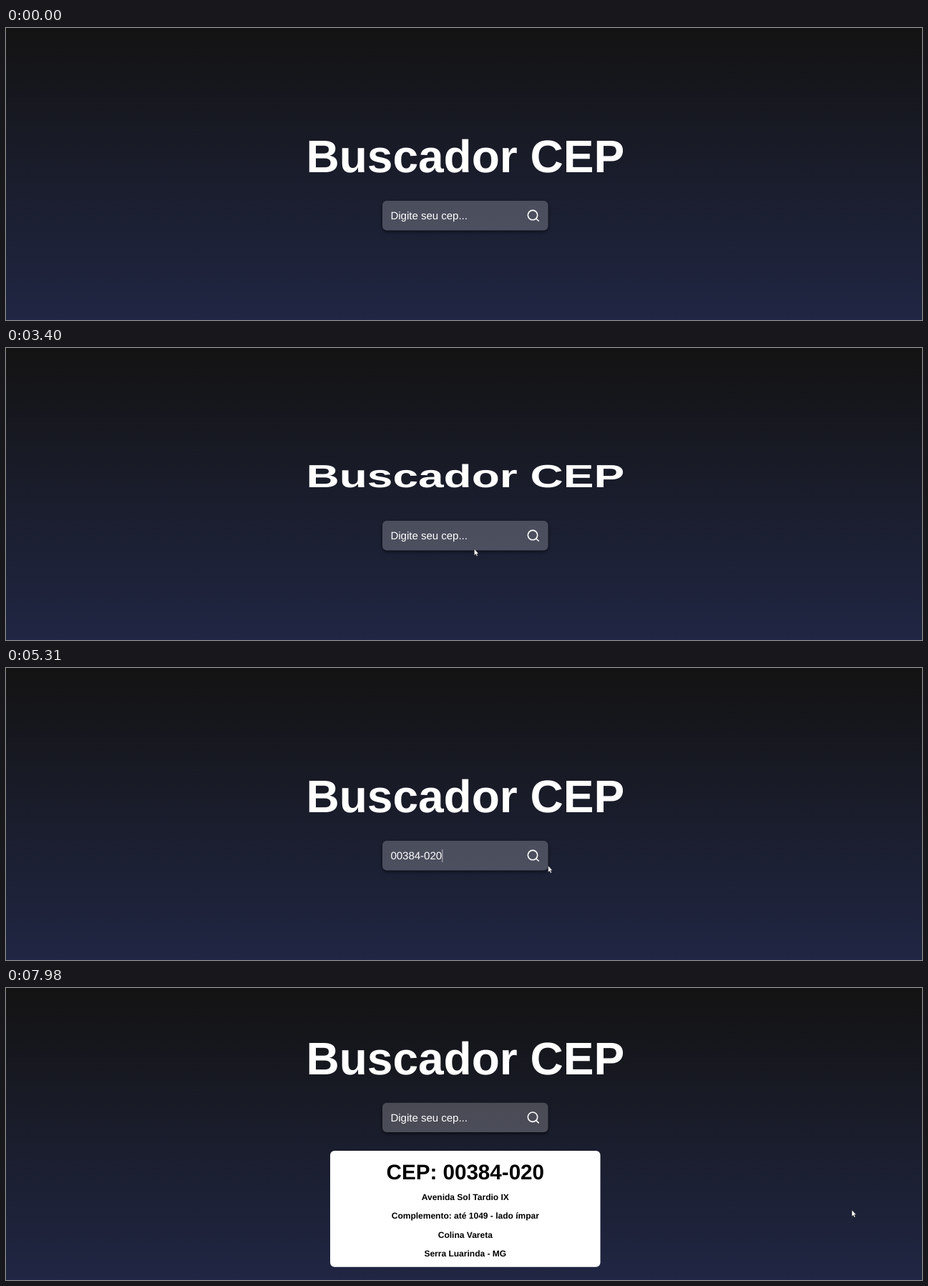
Write an HTML page that moves like this. It is 1280 by 409 pixels and loops after 8000 ms.

```html
<!DOCTYPE html>
<html lang="pt-BR">
<head>
<meta charset="utf-8">
<title>Buscador CEP</title>
<style>
  html, body { margin: 0; width: 100%; height: 100%; overflow: hidden; background: #121212; }
  svg { display: block; width: 100vw; height: 100vh; }
  text { font-family: "Liberation Sans", Arial, sans-serif; text-rendering: geometricPrecision; }
  .bold { font-weight: 700; text-anchor: middle; }
  .line { font-size: 12px; }
</style>
</head>
<body>
<svg viewBox="0 0 1280 409" preserveAspectRatio="none">
  <defs>
    <linearGradient id="sky" x1="0" y1="0" x2="0" y2="1">
      <stop offset="0" stop-color="#131313"/>
      <stop offset="1" stop-color="#202643"/>
    </linearGradient>
    <filter id="blur" x="-10%" y="-40%" width="120%" height="180%">
      <feGaussianBlur stdDeviation="2.2"/>
    </filter>
    <clipPath id="outside">
      <path clip-rule="evenodd" d="M500 220H790V310H500Z M532 242.1H751.5a6 6 0 0 1 6 6V277.4a6 6 0 0 1 -6 6H532a6 6 0 0 1 -6 -6V248.1a6 6 0 0 1 6 -6Z"/>
    </clipPath>
  </defs>

  <rect width="1280" height="409" fill="url(#sky)"/>

  <g id="form">
    <g id="title"><text class="bold" y="22" font-size="64" fill="#fff">Buscador CEP</text></g>
    <g clip-path="url(#outside)">
      <rect x="526" y="244.1" width="231.5" height="41.3" rx="6" opacity=".6" filter="url(#blur)"/>
    </g>
    <rect x="526" y="242.1" width="231.5" height="41.3" rx="6" fill="#fff" fill-opacity=".21"/>
    <text id="field" x="537.4" y="268.4" font-size="15" fill="#fff"></text>
    <rect id="caret" y="254" width="1" height="18" fill="#fff" opacity=".6"/>
    <g id="icon" fill="none" stroke="#fff" stroke-width="1.6" stroke-linecap="round">
      <circle cx="-.8" cy="-.8" r="6.7"/>
      <path d="M4.1 4.1L7.4 7.4"/>
    </g>
  </g>

  <g id="card">
    <rect x="453" y="228" width="377.5" height="162.8" rx="6" fill="#fff"/>
    <text class="bold" x="641.8" y="267.5" font-size="29.6">CEP: 00384-020</text>
    <text class="bold line" x="641.8" y="297.2">Avenida Sol Tardio IX</text>
    <text class="bold line" x="641.8" y="323.4">Complemento: até 1049 - lado ímpar</text>
    <text class="bold line" x="641.8" y="349.6">Colina Vareta</text>
    <text class="bold line" x="641.8" y="375.8">Serra Luarinda - MG</text>
  </g>

  <g id="cursor">
    <path id="arrow" d="M0 0V9L2 7.2L3.4 10.2L4.9 9.5L3.5 6.6H6Z" fill="#fff" stroke="#111" stroke-width=".4"/>
    <path id="beam" d="M-1.8 -4.5H1.8M0 -4.5V4.5M-1.8 4.5H1.8" fill="none" stroke-width=".8"/>
    <path id="hand" d="M-.8 .6Q0 -.6 .8 .6V4L4 4.8V8L3 10.5H-1.2L-3.4 6.8L-2.6 6L-.8 7Z" fill="#fff" stroke="#111" stroke-width=".5"/>
  </g>
</svg>
<script>
const LOOP = 8000;
const RELOAD = 2870, FLIP_START = 2820, FLIP_TIME = 2000;
const FOCUS = 4080, PASTE = 4900, BLINK = 500, RESULT = 5910;
const HOVER = 5480, HOVER_TIME = 400, ICON_GROWTH = 0.22;

// time, x, y, pointer shape from then on
const path = [
  [310, 600, 229, 'arrow'], [640, 233, 73, 'arrow'], [720, 233, 73, ''],
  [3270, 590, 230, 'arrow'], [3335, 652, 290, 'arrow'], [3400, 654.5, 281.5, 'arrow'],
  [3540, 632, 268, 'beam'], [3740, 619, 265, 'beam'], [4900, 619, 265, ''],
  [5100, 622, 265, 'beam'], [5240, 722, 272, 'beam'], [5300, 757.6, 277, 'arrow'],
  [5440, 757.6, 277, 'arrow'], [5500, 745, 268, 'hand'], [5840, 738, 263, 'hand'],
  [RESULT, 740, 266, 'beam'], [6300, 740, 266, 'beam'], [6460, 755, 264, 'beam'],
  [6600, 775, 250, 'beam'], [6740, 838, 262, 'arrow'], [7000, 965, 322, 'arrow'],
  [7210, 1045, 336, 'arrow'], [7350, 1054, 334, 'arrow'], [7680, 1204, 222, 'arrow'],
  [7980, 1182, 311, 'arrow'], [LOOP, 1182, 311, 'arrow']
];

const el = id => document.getElementById(id);
const show = (id, on) => el(id).setAttribute('visibility', on ? 'visible' : 'hidden');
const move = (id, x, y, more = '') => el(id).setAttribute('transform', `translate(${x} ${y}) ${more}`);
const clamp = v => Math.min(1, Math.max(0, v));

// cubic-bezier(.25, .1, .25, 1)
function ease(x) {
  x = clamp(x);
  const curve = (s, a, b) => 3 * s * (1 - s) ** 2 * a + 3 * s * s * (1 - s) * b + s ** 3;
  let lo = 0, hi = 1;
  for (let i = 0; i < 24; i++) {
    const mid = (lo + hi) / 2;
    if (curve(mid, .25, .25) < x) lo = mid; else hi = mid;
  }
  return curve(hi, .1, 1);
}

function pointer(t) {
  const i = path.findLastIndex(p => p[0] <= t);
  if (i < 0) return { x: 0, y: 0, kind: '' };
  const a = path[i], b = path[i + 1] || a;
  const k = b === a ? 0 : (t - a[0]) / (b[0] - a[0]);
  return { x: a[1] + (b[1] - a[1]) * k, y: a[2] + (b[2] - a[2]) * k, kind: a[3] };
}

function titleScale(t) {
  if (t < RELOAD) return 1;
  if (t < RELOAD + 50) return 0;
  return Math.cos(Math.PI / 2 * (1 - ease((t - FLIP_START) / FLIP_TIME)));
}

function draw(t) {
  const found = t >= RESULT, pasted = t >= PASTE && !found;
  move('form', 0, found ? -81.4 : 0);
  show('card', found);

  const flip = titleScale(t);
  show('title', flip > 0);
  move('title', 641.8, 180, `scale(1 ${flip || .001})`);

  el('field').textContent = pasted ? '00384-020' : 'Digite seu cep...';
  const since = t - (pasted ? PASTE : FOCUS);
  show('caret', t >= FOCUS && !found && Math.floor(since / BLINK) % 2 === 0);
  el('caret').setAttribute('x', pasted ? 609.3 : 537);

  const hover = found ? 1 - ease((t - RESULT) / HOVER_TIME) : ease((t - HOVER) / HOVER_TIME);
  move('icon', 736.8, 262.9, `scale(${1 + ICON_GROWTH * hover})`);

  const p = pointer(t);
  move('cursor', p.x, p.y);
  for (const kind of ['arrow', 'beam', 'hand']) show(kind, p.kind === kind);
  el('beam').setAttribute('stroke', found ? '#444' : '#888');
}

function tick(now) {
  draw(now % LOOP);
  requestAnimationFrame(tick);
}
draw(0);
requestAnimationFrame(tick);
</script>
</body>
</html>
```
